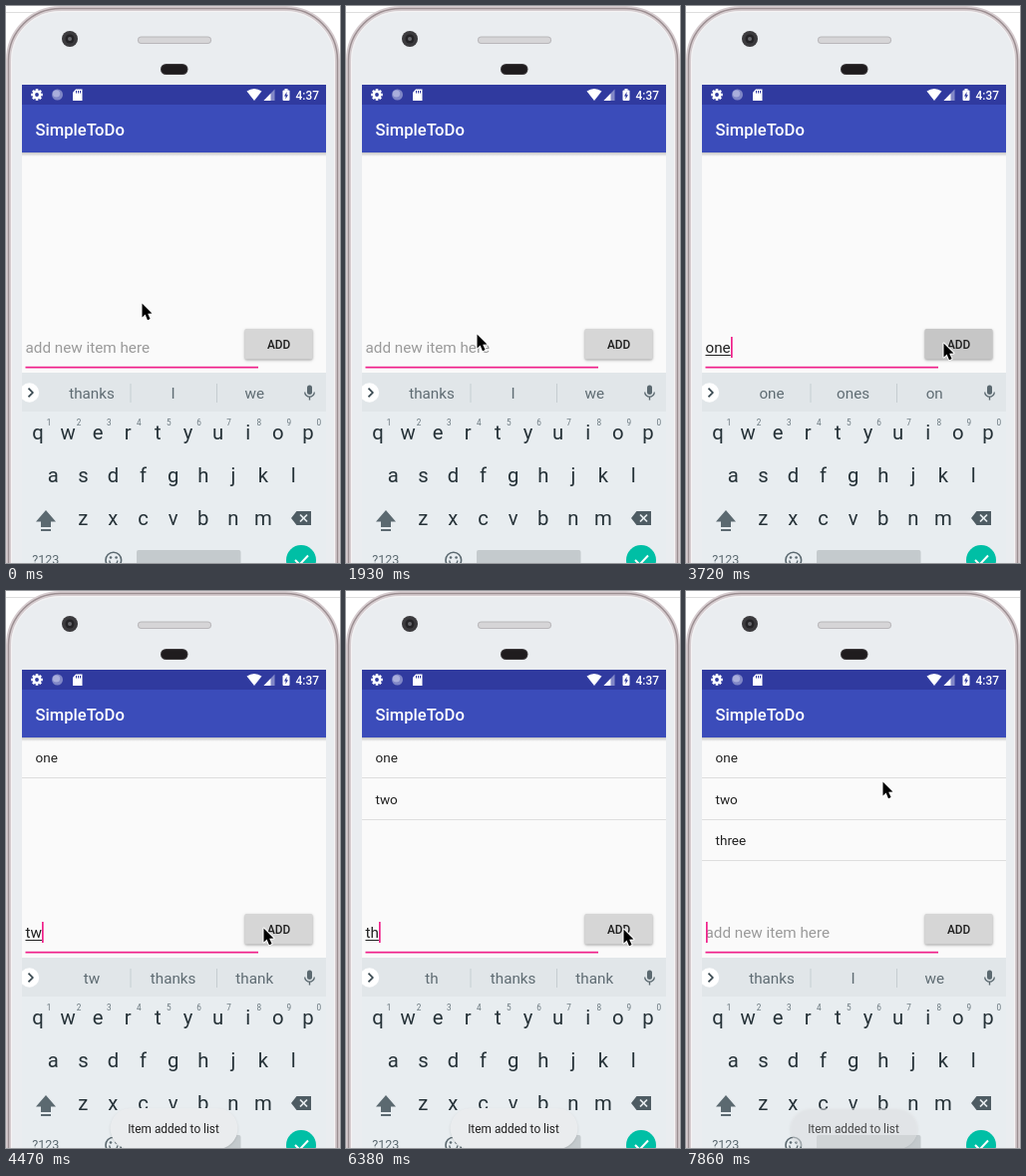
These frames come from a looping animation (335x559 px, 8000 ms). An HTML page with a canvas:

```html
<!DOCTYPE html>
<html lang="en">
<head>
<meta charset="utf-8">
<title>To-do list demo</title>
<style>
  html, body { margin: 0; width: 100%; height: 100%; overflow: hidden; background: #fff; }
  canvas { display: block; width: 335px; height: 559px; }
</style>
</head>
<body>
<canvas id="stage"></canvas>
<script>
const W = 335, H = 559, LOOP = 8000;
const canvas = document.getElementById('stage');
const ctx = canvas.getContext('2d');
const dpr = window.devicePixelRatio || 1;
canvas.width = W * dpr;
canvas.height = H * dpr;

const PINK = '#f0218a', KEY = '#263238', ICON = '#5b6970', BOARD = '#e8edf0';
const IDLE = 'thanks I we';

// Each step changes only the listed parts of the state.
const steps = [
  [0, { mouse: [136, 298], typed: '', words: IDLE, caret: 0, rows: 0, press: 0, toast: 0 }],
  [300, { caret: 1 }],
  [900, { caret: 0 }],
  [1340, { caret: 1, mouse: [134, 320] }],
  [1490, { mouse: [130, 342] }],
  [1650, { mouse: [131, 329] }],
  [1930, { caret: 0 }],
  [2380, { caret: 1, typed: 'on', words: 'on one in' }],
  [2530, { typed: 'one', words: 'one ones on' }],
  [3130, { caret: 0 }],
  [3280, { mouse: [168, 332] }],
  [3420, { mouse: [236, 337] }],
  [3570, { mouse: [258, 338], caret: 1 }],
  [3720, { press: 0.6 }],
  [3870, { press: 1, typed: '', words: IDLE, rows: 1 }],
  [4020, { press: 0.5, toast: 0.6 }],
  [4170, { press: 0, toast: 1 }],
  [4470, { typed: 'tw', words: 'tw thanks thank' }],
  [4610, { typed: 'two', words: 'two twos too' }],
  [5060, { caret: 0, mouse: [270, 339] }],
  [5210, { mouse: [278, 339] }],
  [5350, { press: 0.6 }],
  [5500, { press: 1, typed: '', words: IDLE, rows: 2, caret: 1 }],
  [5640, { press: 0.5 }],
  [5930, { press: 0 }],
  [6080, { caret: 0 }],
  [6380, { caret: 1, typed: 'th', words: 'th thanks thank' }],
  [6530, { typed: 'thre', words: 'thre three there' }],
  [6830, { typed: 'three', words: 'three threes there' }],
  [6980, { press: 0.6 }],
  [7120, { press: 1, typed: '', words: IDLE, rows: 3 }],
  [7270, { press: 0.5 }],
  [7420, { press: 0, mouse: [266, 306] }],
  [7560, { mouse: [225, 236] }],
  [7710, { mouse: [197, 192] }],
  [7860, { mouse: [197, 191], toast: 0.5 }]
];

function stateAt(t) {
  const s = {};
  for (const [at, change] of steps) if (at <= t) Object.assign(s, change);
  return s;
}

function rect(x, y, w, h, color) {
  ctx.fillStyle = color;
  ctx.fillRect(x, y, w, h);
}

function round(x, y, w, h, r, color) {
  ctx.beginPath();
  ctx.roundRect(x, y, w, h, r);
  ctx.fillStyle = color;
  ctx.fill();
}

function circle(x, y, r, color) {
  ctx.beginPath();
  ctx.arc(x, y, r, 0, Math.PI * 2);
  ctx.fillStyle = color;
  ctx.fill();
}

function path(points, close) {
  ctx.beginPath();
  points.forEach(([x, y]) => ctx.lineTo(x, y));
  if (close) ctx.closePath();
}

function poly(points, color) {
  path(points, true);
  ctx.fillStyle = color;
  ctx.fill();
}

function line(points, color, width) {
  path(points);
  stroke(color, width);
}

function stroke(color, width) {
  ctx.strokeStyle = color;
  ctx.lineWidth = width;
  ctx.stroke();
}

function text(str, x, y, size, color, align = 'left', weight = 400) {
  ctx.font = `${weight} ${size}px Roboto, "Noto Sans", sans-serif`;
  ctx.textAlign = align;
  ctx.fillStyle = color;
  ctx.fillText(str, x, y);
}

function withShadow(color, blur, dy, draw) {
  ctx.save();
  ctx.shadowColor = color;
  ctx.shadowBlur = blur * dpr;
  ctx.shadowOffsetY = dy * dpr;
  draw();
  ctx.restore();
}

function drawPhone() {
  rect(0, 0, W, H, '#fff');
  rect(0, 6, W, 1, '#dedede');
  rect(238, 0, 9, 3, '#77696c');
  rect(0, 65, 3, 5, '#8d8285');
  rect(332, 65, 3, 5, '#8d8285');
  ctx.beginPath();
  ctx.roundRect(2.5, 2.5, 330, 640, 52);
  ctx.fillStyle = '#eaedf0';
  ctx.fill();
  stroke('#d6cccf', 5);
  stroke('#9c8f92', 1.5);
  ctx.beginPath();
  ctx.roundRect(5.5, 5.5, 324, 640, 49);
  stroke('#f6f4f5', 1);

  circle(64, 33, 8, '#3b3a3d');
  circle(64, 33, 4.5, '#242326');
  circle(64, 33, 2, '#68686d');
  round(132, 30.5, 74, 7.5, 3.75, '#b9b7ba');
  round(133, 31.5, 72, 5.5, 2.75, '#d6d5d7');
  round(155, 58, 27.5, 11, 5.5, '#3c393b');
  round(156, 59, 25.5, 9, 4.5, '#1f1c1e');
}

function drawStatus() {
  rect(16, 79, 305, 20, '#303a9f');
  for (let i = 0; i < 4; i++) {
    const a = i * Math.PI / 4, dx = Math.cos(a) * 5.8, dy = Math.sin(a) * 5.8;
    line([[31 - dx, 89 - dy], [31 + dx, 89 + dy]], '#fff', 2.6);
  }
  circle(31, 89, 4.4, '#fff');
  circle(31, 89, 1.9, '#303a9f');

  circle(51.5, 89, 5.5, '#7f86c6');
  circle(50.5, 88, 3.6, '#a9aedb');

  poly([[70, 83.5], [76.5, 83.5], [76.5, 95], [67, 95], [67, 86.8]], '#fff');
  for (const x of [70, 72, 74]) rect(x, 85, 1, 2.5, '#303a9f');

  ctx.beginPath();
  ctx.moveTo(249, 95);
  ctx.lineTo(241.5, 85.5);
  ctx.quadraticCurveTo(249, 80.5, 256.5, 85.5);
  ctx.closePath();
  ctx.fillStyle = '#fff';
  ctx.fill();

  poly([[269.5, 83.5], [269.5, 95], [258.5, 95]], '#8389c7');
  poly([[265.5, 87.8], [265.5, 95], [258.5, 95]], '#fff');

  round(277.5, 84.5, 7, 10.5, 1, '#fff');
  rect(279.5, 83, 3, 2, '#fff');
  poly([[281.6, 86], [279, 90.4], [280.6, 90.4], [280.4, 93.5], [283, 89.2], [281.4, 89.2]], '#303a9f');
  text('4:37', 314, 93.6, 11.9, '#fff', 'right', 500);
}

function drawApp(s) {
  rect(16, 99, 305, H - 99, '#fafafa');
  drawStatus();
  const shade = ctx.createLinearGradient(0, 147, 0, 151);
  shade.addColorStop(0, 'rgba(0,0,0,.22)');
  shade.addColorStop(1, 'rgba(0,0,0,0)');
  rect(16, 147, 305, 4, shade);
  rect(16, 99, 305, 48, '#3b4cba');
  text('SimpleToDo', 29.5, 129.6, 16.6, '#fff', 'left', 500);

  ['one', 'two', 'three'].slice(0, s.rows).forEach((item, i) => {
    const y = 147 + i * 41.5;
    text(item, 29.5, y + 25.2, 13.55, '#212121');
    rect(16, Math.round(y + 40), 305, 1, '#dedede');
  });
}

function drawInput(s) {
  let end = 19.5;
  if (s.typed) {
    text(s.typed, 19.5, 348.2, 15.25, '#212121');
    const w = ctx.measureText(s.typed).width;
    rect(19.5, 350, w, 1, '#212121');
    end += w;
  } else {
    text('add new item here', 19.5, 348.2, 15.25, '#9a9a9a');
  }
  rect(19.5, 361.8, 233.5, 1.7, PINK);
  if (s.caret) rect(Math.round(end), 332, 1.7, 21, PINK);

  const grey = Math.round(214 - 27 * s.press);
  withShadow('rgba(0,0,0,.35)', 2.5, 1, () =>
    round(239.5, 324, 68, 30.5, 1.7, `rgb(${grey},${grey},${grey})`));
  text('ADD', 273.6, 343.6, 11.86, '#212121', 'center', 500);
}

function drawSuggestions(words) {
  rect(16, 368, 305, 39, '#e1e6e9');
  ctx.save();
  ctx.beginPath();
  ctx.rect(16, 368, 305, 39);
  ctx.clip();
  circle(23.5, 388, 9.7, '#fff');
  ctx.restore();
  line([[22.5, 383.7], [26.8, 388], [22.5, 392.3]], '#37474f', 1.7);
  words.split(' ').forEach((word, i) =>
    text(word, 86 + i * 81.6, 394, 15.25, '#5f6c73', 'center'));
  rect(124.5, 379, 1, 19, '#c6cdd1');
  rect(211, 379, 1, 19, '#c6cdd1');

  round(302, 380.5, 5, 9.5, 2.5, ICON);
  ctx.beginPath();
  ctx.arc(304.5, 387.4, 4.8, 0, Math.PI);
  stroke(ICON, 1.3);
  rect(303.8, 392, 1.4, 3.5, ICON);
}

function drawKeys() {
  rect(16, 407, 305, H - 407, BOARD);
  const rows = [['qwertyuiop', 32, 435], ['asdfghjkl', 47.3, 477.5], ['zxcvbnm', 77.3, 520.5]];
  for (const [letters, x, y] of rows)
    [...letters].forEach((c, i) => text(c, x + i * 30.1, y, 20.3, KEY, 'center'));
  for (let i = 0; i < 10; i++)
    text((i + 1) % 10, 43 + i * 30.1, 420.6, 8.2, '#68767d', 'center');

  poly([[40, 506], [50, 517.5], [45, 517.5], [45, 523], [35, 523], [35, 517.5], [30, 517.5]], ICON);
  rect(35, 525, 10, 2, ICON);

  poly([[286, 514], [291.5, 507], [306, 507], [306, 521], [291.5, 521]], '#4e5c63');
  line([[295, 510.5], [302, 517.5]], BOARD, 1.7);
  line([[302, 510.5], [295, 517.5]], BOARD, 1.7);

  text('?123', 39.8, 560.3, 12.6, ICON, 'center');

  ctx.beginPath();
  ctx.arc(107.8, 556, 7.8, 0, Math.PI * 2);
  stroke(ICON, 1.6);
  circle(105, 553.5, 1.3, ICON);
  circle(110.6, 553.5, 1.3, ICON);
  ctx.beginPath();
  ctx.arc(107.8, 556.5, 4, 0, Math.PI);
  stroke(ICON, 1.4);

  round(131, 546, 104.5, 20, 2, '#c4cacd');
  circle(296, 556, 15, '#00bfa5');
  line([[290, 556], [294.5, 560.5], [303, 551.5]], '#fff', 2);
}

function drawToast(alpha) {
  if (!alpha) return;
  ctx.save();
  ctx.globalAlpha = alpha;
  withShadow('rgba(0,0,0,.12)', 2, 1, () => round(104.5, 519, 128, 41, 20.5, '#eaecee'));
  ctx.globalAlpha = Math.min(1, alpha * 1.6);
  text('Item added to list', 168, 544, 11.86, '#212121', 'center');
  ctx.restore();
}

function drawMouse([x, y]) {
  ctx.save();
  ctx.translate(x, y);
  path([[0.5, 0.5], [0.5, 14.5], [3.6, 11.6], [6, 17.2], [8.6, 16.1], [6.2, 10.7], [10.5, 10.5]], true);
  ctx.lineJoin = 'round';
  stroke('#fff', 2);
  ctx.fillStyle = '#000';
  ctx.fill();
  ctx.restore();
}

function draw(t) {
  const s = stateAt(t);
  ctx.setTransform(dpr, 0, 0, dpr, 0, 0);
  drawPhone();
  drawApp(s);
  drawInput(s);
  drawSuggestions(s.words);
  drawKeys();
  drawToast(s.toast);
  drawMouse(s.mouse);
}

const start = performance.now();
function tick() {
  draw((performance.now() - start) % LOOP);
  requestAnimationFrame(tick);
}
tick();
</script>
</body>
</html>
```
